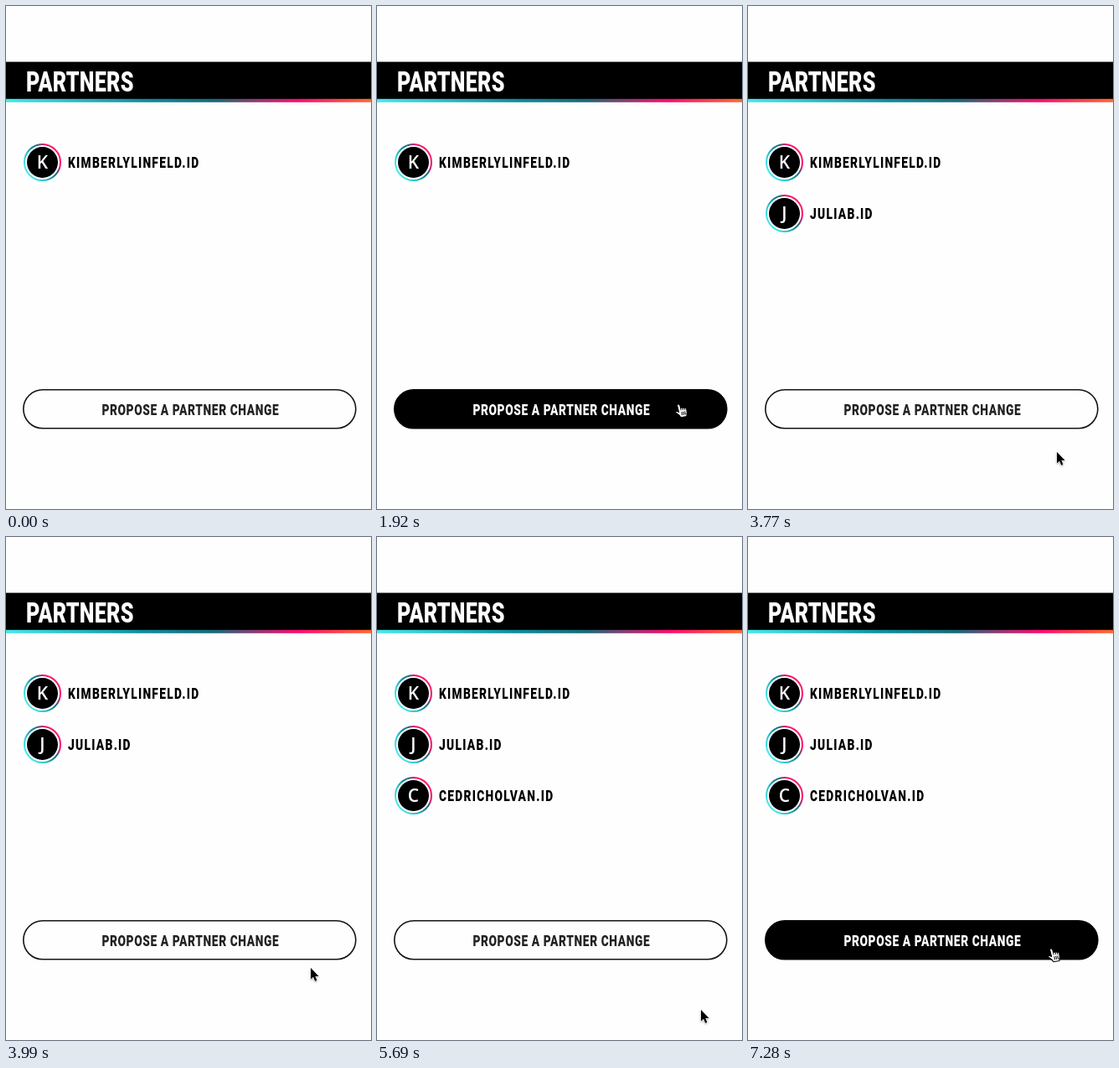
Write an HTML page that moves like this. It is 436 px wide and 600 px high and loops after 8 s.

```html
<!DOCTYPE html>
<html lang="en">
<head>
<meta charset="utf-8">
<title>Partners</title>
<style>
  html, body { margin: 0; width: 100%; height: 100%; overflow: hidden; background: #fefefe; }
  svg { display: block; width: 436px; height: 600px; }
  text { font-family: Roboto, "Liberation Sans", sans-serif; font-weight: 900; }
  .title { font-size: 34px; letter-spacing: .3px; fill: #fff; }
  .name { font-size: 18.6px; letter-spacing: 1.75px; }
  .label { font-size: 18.6px; letter-spacing: .8px; font-weight: 800; fill: #222; text-anchor: middle; }
  .initial { font: 600 21px "Open Sans", sans-serif; fill: #fff; text-anchor: middle; }
  .pill { fill: #fefefe; stroke: #141414; stroke-width: 1.6; }
  .hover .pill { fill: #000; stroke: #000; }
  .hover .label { fill: #fff; }
</style>
</head>
<body>
<svg viewBox="0 0 436 600">
  <defs>
    <linearGradient id="bar">
      <stop offset="0" stop-color="#45e8ea"/>
      <stop offset=".38" stop-color="#0d8c9c"/>
      <stop offset=".57" stop-color="#176a78"/>
      <stop offset=".8" stop-color="#ff0a70"/>
      <stop offset="1" stop-color="#ff6a30"/>
    </linearGradient>
    <linearGradient id="ring" x1="0" y1=".85" x2="1" y2=".15">
      <stop offset=".1" stop-color="#45e8ea"/>
      <stop offset=".3" stop-color="#2cc5cd"/>
      <stop offset=".5" stop-color="#0d8c9c"/>
      <stop offset=".64" stop-color="#2a6578"/>
      <stop offset=".77" stop-color="#f50a70"/>
      <stop offset="1" stop-color="#ff2a68"/>
    </linearGradient>
  </defs>

  <rect y="66.6" width="436" height="45"/>
  <rect y="110.8" width="436" height="4" fill="url(#bar)"/>
  <g transform="translate(24 102.4) scale(.74 1)"><text class="title">PARTNERS</text></g>

  <g id="rows"></g>

  <g id="button">
    <rect class="pill" x="20.8" y="457.8" width="397" height="46" rx="23"/>
    <g transform="translate(220.3 488.2) scale(.74 1)"><text class="label">PROPOSE A PARTNER CHANGE</text></g>
  </g>

  <g id="hand" stroke="#000" stroke-linejoin="round" stroke-linecap="round">
    <g transform="translate(-1) rotate(-10)">
      <path fill="#fff" d="M-1.6 1.4a1.5 1.5 0 0 1 3 0L1.8 5q1.4-1 2.4.3q1.4-.8 2.3.5q2-.4 2.1 1.4L8.4 11.5Q7.6 13 7.4 16H.2Q-1 13-4.6 9.6q-.8-1.8 1-1.8L-1 9.6Z"/>
      <path fill="none" stroke-width=".9" d="M1.8 5v2.4M4.2 5.3v2.2M6.5 5.8v2M2.2 10v3.4M4.2 10v3.4M6.1 10v3.4"/>
    </g>
  </g>
  <path id="arrow" stroke="#fff" stroke-width="1" paint-order="stroke"
    style="filter: drop-shadow(0 1px 1px #0005)"
    d="M0 1V14.6L3.1 11.8 5.2 16.8 7.4 15.9 5.4 11H9.6Z"/>
</svg>

<script>
const LOOP = 8000;
const $ = id => document.getElementById(id);

const partners = [
  { name: 'KIMBERLYLINFELD.ID', from: 0 },
  { name: 'JULIAB.ID', from: 2310 },
  { name: 'CEDRICHOLVAN.ID', from: 5170 }
];

// Each move: start, end, number of steps, pointer position reached
const moves = [
  [500, 500, 1, 419, 528],
  [560, 730, 4, 364, 486],
  [1810, 1920, 2, 361, 475],
  [2310, 2310, 1, 365, 498],
  [2380, 2450, 2, 370, 534],
  [2690, 2690, 1, 369, 533],
  [3770, 4220, 9, 358, 485],
  [4870, 4990, 2, 361, 497],
  [5340, 5690, 7, 387, 563],
  [6710, 7280, 11, 363, 491]
];

// After a click the button stays plain until the pointer comes back
const cleared = [[2310, 3770], [5170, 6710]];

$('rows').innerHTML = partners.map(({ name }, i) => `
  <g transform="translate(0 ${i * 61})">
    <circle cx="43.5" cy="186.5" r="21.5" fill="#fff" stroke="url(#ring)" stroke-width="2"/>
    <circle cx="43.5" cy="186.5" r="18.5"/>
    <text class="initial" x="43.5" y="193.7">${name[0]}</text>
    <g transform="translate(74 192.8) scale(.74 1)"><text class="name">${name}</text></g>
  </g>`).join('');
const rows = [...$('rows').children];

const smooth = u => u * u * (3 - 2 * u);

function pointerAt(t) {
  let pos = null;
  for (const [start, end, steps, x, y] of moves) {
    if (t < start) break;
    const gap = (end - start) / (steps - 1);
    const done = t >= end ? steps : Math.floor((t - start) / gap) + 1;
    const p = smooth(done / steps);
    const [px, py] = pos || [x, y];
    pos = [px + (x - px) * p, py + (y - py) * p];
  }
  return pos;
}

function place(el, pos, visible) {
  el.style.display = visible ? '' : 'none';
  if (visible) el.setAttribute('transform', `translate(${pos.map(Math.round).join(' ')})`);
}

function draw(t) {
  const pos = pointerAt(t);
  const inside = !!pos && pos[0] < 418 && pos[1] > 458 && pos[1] < 504;
  const plain = cleared.some(([a, b]) => t >= a && t < b);
  rows.forEach((row, i) => row.style.display = t >= partners[i].from ? '' : 'none');
  $('button').classList.toggle('hover', inside && !plain);
  place($('hand'), pos, inside);
  place($('arrow'), pos, !!pos && !inside);
}

const began = performance.now();
function tick() {
  draw((performance.now() - began) % LOOP);
  requestAnimationFrame(tick);
}
tick();
</script>
</body>
</html>
```
